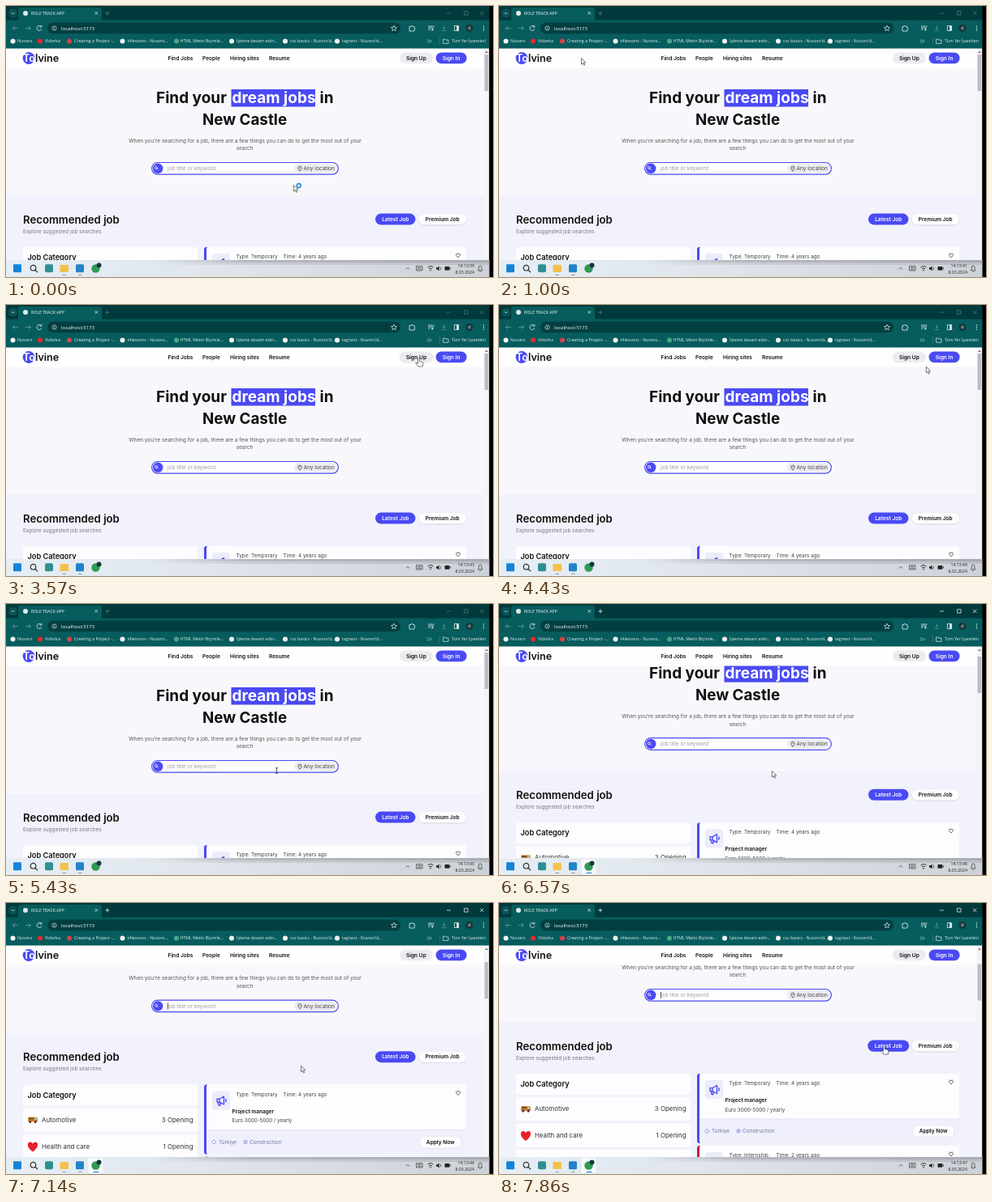
These frames come from a looping animation (600 px wide and 335 px high, 8000 ms). An HTML page:

```html
<!DOCTYPE html>
<html lang="en">
<head>
<meta charset="utf-8">
<title>Job search page</title>
<style>
  html, body { margin: 0; width: 100%; height: 100%; overflow: hidden; background: #000; }
  svg { display: block; width: 100%; height: 100%; }
  text { font-family: Inter, sans-serif; white-space: pre; }
  .ui { font-family: "Open Sans", sans-serif; }
  .button { transform-box: fill-box; transform-origin: center; }
</style>
</head>
<body>
<svg id="stage" viewBox="0 0 600 335"></svg>
<script>
const BLUE = '#4a4af4', INK = '#111', GREY = '#666', LIGHT = '#e4f0f0';

// Markup helpers
const rect = (x, y, w, h, fill, r = 0, extra = '') =>
  `<rect x="${x}" y="${y}" width="${w}" height="${h}" rx="${r}" fill="${fill}" ${extra}/>`;
const dot = (x, y, r, fill, extra = '') => `<circle cx="${x}" cy="${y}" r="${r}" fill="${fill}" ${extra}/>`;
const line = (d, color, width = 0.8, extra = '') =>
  `<path d="${d}" fill="none" stroke="${color}" stroke-width="${width}" ${extra}/>`;
const shape = (d, fill, extra = '') => `<path d="${d}" fill="${fill}" ${extra}/>`;
const text = (x, y, str, size, fill = INK, weight = 400, extra = '') =>
  `<text x="${x}" y="${y}" font-size="${size}" fill="${fill}" font-weight="${weight}" ${extra}>${str}</text>`;
const ui = (x, y, str, size = 5.3, fill = LIGHT, extra = '') => text(x, y, str, size, fill, 400, 'class="ui" ' + extra);
const group = (id, body, extra = '') => `<g id="${id}" ${extra}>${body}</g>`;
const at = (x, y, body) => `<g transform="translate(${x} ${y})">${body}</g>`;
const gradient = (id, attrs, ...stops) => `<linearGradient id="${id}" ${attrs}>` + stops.map(([offset, color, alpha = 1]) =>
  `<stop offset="${offset}" stop-color="${color}" stop-opacity="${alpha}"/>`).join('') + '</linearGradient>';
const middle = 'text-anchor="middle"', end = 'text-anchor="end"';

const lens = (x, y, r, color, width) =>
  line(`M${x - r} ${y}a${r} ${r} 0 1 1 ${2 * r} 0a${r} ${r} 0 1 1 ${-2 * r} 0M${x + r * .7} ${y + r * .7}l${r} ${r}`, color, width);
const HEART = 'M0 3C-4 0-3-2.6-1.5-2.6Q-.4-2.6 0-1.5Q.4-2.6 1.5-2.6C3-2.6 4 0 0 3Z';

function pill(id, x, y, w, h, label, fill, color, extra = '') {
  return group(id, rect(x, y, w, h, fill, h / 2, extra) +
    text(x + w / 2, y + h / 2 + 2.3, label, 6.6, color, 600, middle), 'class="button"');
}

const megaphone = line('M-5-1.8H-2L3.5-5V5L-2 2H-5ZM-2-1.8V2M-4 2L-3 6H-.8L-1.6 2M5.4-2Q7 0 5.4 2M3.5-1.2V1.2',
  BLUE, 1.3, 'stroke-linejoin="round"');

function jobCard(y, color, kind, age) {
  return rect(246, y, 321, 86, '#fdfdff', 3) +
    shape(`M246 ${y + 56}H567V${y + 83}q0 3-3 3H246Z`, '#f0f0fd') +
    line(`M246 ${y + 56}H567`, '#d9d9f4', .7) +
    shape(`M248 ${y}h-1q-3 0-3 3v80q0 3 3 3h1q-1-1-1-3v-80q0-2 1-3Z`, color) +
    rect(254, y + 8, 22, 23, '#ececfb', 3) +
    at(265, y + 19.5, megaphone) +
    text(283.5, y + 14, 'Type: ' + kind, 6.35, '#444') +
    text(341.5, y + 14, `Time: ${age} years ago`, 6.35, '#444') +
    at(557, y + 10.3, line(HEART, '#222', .8, 'transform="scale(.85)"'));
}

function categoryRow(y, label, count, icon) {
  return rect(21, y, 215, 29, '#fdfdff', 3) + at(33, y + 14.5, icon) +
    text(44, y + 17, label, 7.9, '#333') + text(230.5, y + 17, count, 7.9, '#333', 400, end);
}

const bus = rect(-6, -3.5, 12, 6, '#e9a23a', 1.2) + rect(-5, -2.6, 6.5, 2.2, '#6b4a35') +
  rect(2.5, -2.6, 2.7, 2.2, '#8fc3dc') + rect(-6, .6, 12, .9, '#c0392b') +
  dot(-3.2, 2.8, 1.4, '#333') + dot(3.2, 2.8, 1.4, '#333');
const heart = shape(HEART, '#e8202a', 'transform="scale(2.15)"');

const page =
  rect(0, 52, 589, 482, '#f8f8fc') + rect(0, 234, 589, 300, '#f2f2fc') +
  text(185, 120.3, 'Find your', 19, INK, 700) +
  rect(277.5, 103, 103.5, 21.5, BLUE) +
  text(278.5, 120.3, 'dream jobs', 19, '#fff', 700) +
  text(386.5, 120.3, 'in', 19, INK, 700) +
  text(294, 147, 'New Castle', 18.8, INK, 700, middle) +
  text(294.5, 168.6, "When you're searching for a job, there are a few things you can do to get the most out of your",
    6.47, '#555', 400, middle) +
  text(294, 178.4, 'search', 6.47, '#555', 400, middle) +
  rect(179.6, 193.5, 229.8, 14.6, '#fdfdff', 7.3, `stroke="${BLUE}" stroke-width="1.2"`) +
  dot(187.2, 200.8, 6.2, BLUE) + lens(185, 200, 1.5, '#fff', .8) +
  text(199, 203, 'job title or keyword', 6.55, '#a0a0a4') +
  group('caret', line('M199.5 197V204.6', '#222', .8)) +
  rect(355, 195, 52, 11.6, '#ececf1', 5.8) +
  line('M362 204.2Q358.4 200.5 360.2 198.7Q362 197.3 363.8 198.7Q365.6 200.5 362 204.2Z', '#333', .7) +
  dot(362, 200.2, .6, '#333') +
  text(366.5, 203, 'Any location', 6.55, '#444') +
  text(21, 268.5, 'Recommended job', 13.2, INK, 600) +
  text(21, 280.8, 'Explore suggested job searches', 6.4, '#777') +
  pill('latest', 455, 256.6, 49.5, 14, 'Latest Job', BLUE, '#fff') +
  rect(508.3, 257.4, 59, 14, '#d6d6e2', 7) +
  pill('premium', 508.3, 256.6, 59, 14, 'Premium Job', '#fdfdff', INK, 'stroke="#e4e4ee" stroke-width=".6"') +
  rect(21, 298, 215, 26, '#fdfdff', 3) + text(26.5, 314, 'Job Category', 9.2, INK, 600) +
  categoryRow(327, 'Automotive', '3 Opening', bus) +
  categoryRow(360, 'Health and care', '1 Opening', heart) +
  rect(21, 392, 215, 29, '#fdfdff', 3) +
  jobCard(298, BLUE, 'Temporary', 4) +
  text(278.5, 333, 'Project manager', 6.5, INK, 600) +
  text(278.5, 344.5, 'Euro 3000-5000 / yearly', 6.3, '#444') +
  line('M256.3 366.2L259 368.9L256.3 371.6L253.6 368.9Z', '#7b7bd8', .8) +
  text(262, 371.2, 'Türkiye', 6.3, '#7272a0') +
  dot(295, 368.9, 2.2, 'none', 'stroke="#7b7bd8" stroke-width=".8"') + dot(295, 368.9, .8, '#7b7bd8') +
  text(300, 371.2, 'Construction', 6.5, '#7272a0') +
  pill('apply', 509.5, 361.8, 51.5, 14.4, 'Apply Now', '#fdfdff', INK, 'stroke="#dedeea" stroke-width=".6"') +
  jobCard(387, '#c8203c', 'Internship', 2);

const navLinks = [[199.5, 'Find Jobs', 31], [242, 'People', 23], [276, 'Hiring sites', 38], [324, 'Resume', 27]];
const header =
  rect(0, 51, 589, 25.5, '#fefefe') +
  dot(28, 64.5, 7.4, BLUE) +
  text(21, 68.8, '<tspan fill="#fff">To</tspan>lvine', 12.6, INK, 600) +
  navLinks.map(([x, label], i) => text(x, 67, label, 6.6, INK, 600, `id="nav${i}"`)).join('') +
  pill('signUp', 485, 57.6, 40.8, 13.6, 'Sign Up', '#ececf0', INK) +
  pill('signIn', 529.6, 57.6, 38, 13.6, 'Sign In', BLUE, '#fff');

const scrollbar =
  rect(588.6, 51, 6.6, 264, '#f4f4f5') + shape('M590 58L592 55.4L594 58Z', '#777') +
  rect(589.6, 60, 4.6, 45, '#bdbdc0', 0, 'id="thumb"');

const bookmarks = [
  [8.5, 14, 'Nuvoro', '#f1f3f4'], [42, 48, 'Vidorka', '#e8262d'], [78, 84, 'Creating a Project -...', '#d8414a'],
  [143.5, 149.5, 't4lessons - Nuvoro...', '#f1f3f4'], [210, 214.5, 'HTML Metin Biçimle...', '#4aa58a'],
  [278, 284, 'İşleme devam edin...', '#f1f3f4'], [344, 350, "css basics - Nuvoro'd...", '#f1f3f4'],
  [408, 414, "tagnest - Nuvoro'd...", '#f1f3f4']
];
const browser =
  rect(0, 0, 595.5, 18, '#003a3c') + rect(0, 17.5, 595.5, 35, '#075c5d') +
  shape('M13 18Q15 18 15 15V5Q15 2 18 2H115Q118 2 118 5V15Q118 18 120 18Z', '#075c5d') +
  rect(3.5, 4, 10, 10, '#0b5355', 3) + line('M6.8 8.2L8.6 10L10.4 8.2', LIGHT) +
  dot(24, 9, 3, '#dfe9e9') + ui(31, 11, 'ROLE TRACK APP', 5.2, '#fff') +
  line('M109.6 7.2L113 10.6M113 7.2L109.6 10.6', LIGHT) +
  group('controls', line('M122.4 9H127.4M124.9 6.5V11.5', LIGHT) +
    line('M543 9H548M564.6 6.7H569V11.1H564.6ZM584 6.7L588.4 11.1M588.4 6.7L584 11.1', '#fff', .7)) +
  line('M14.6 27.5H8.2M11 24.7L8.2 27.5L11 30.3M24 27.5H30.4M27.6 24.7L30.4 27.5L27.6 30.3', '#6f9c9c') +
  line('M43.4 25.6A3 3 0 1 0 43.9 28.4M43.8 23.8V26H41.5', LIGHT) +
  rect(51, 20.6, 435, 13.6, '#033f41', 6.8) +
  dot(59.5, 27.5, 2.6, 'none', `stroke="${LIGHT}" stroke-width=".7"`) + line('M59.5 27V29M59.5 25.8V26.4', LIGHT, .7) +
  ui(68, 29.6, 'localhost:5173', 6.1, '#fff') +
  line('M478 24L479 26.4L481.5 26.6L479.6 28.2L480.2 30.7L478 29.3L475.8 30.7L476.4 28.2L474.5 26.6L477 26.4Z', LIGHT, .7) +
  line('M497 25.4H499A1 1 0 0 1 501 25.4H503V27A1 1 0 0 1 503 29V31H497Z', LIGHT) +
  line('M520 25H525M520 27H525M520 29H522.5M527.5 25H526V29.5', LIGHT, .8) + dot(525.2, 29.6, 1, LIGHT) +
  line('M539.5 24V28.5M537.5 26.7L539.5 28.7L541.5 26.7M536.8 30.6H542.2', '#4f9a9c') +
  line('M552.4 24.5H557.6V30.5H552.4Z', LIGHT) + rect(555.2, 24.5, 2.4, 6, LIGHT) +
  dot(571, 27.5, 4.6, '#17383b') + ui(571, 29.4, 'd', 5.4, '#fff', middle) +
  dot(588.5, 25, .7, LIGHT) + dot(588.5, 27.5, .7, LIGHT) + dot(588.5, 30, .7, LIGHT) +
  bookmarks.map(([ix, tx, label, color]) => dot(ix, 43.5, 3, color) + ui(tx, 45.4, label)).join('') +
  line('M519 41.5L521 43.5L519 45.5M522 41.5L524 43.5L522 45.5', LIGHT, .7) + line('M534.5 39V48', '#3c8586', .7) +
  line('M538.6 41H541L541.8 42H545V46.3H538.6Z', LIGHT, .7) + ui(549, 45.4, 'Tüm Yer İşaretleri', 5.2);

const status = rect(0, 305, 43.5, 9.5, '#07494b', 1) + ui(2, 311.6, 'localhost:5173/#', 5.4, '#fff');

const taskbar =
  gradient('bar', '', [0, '#e6eef5'], [.4, '#e0e6ec'], [1, '#cdd2d8']) +
  gradient('shade', '', [.3, '#85858d', 0], [.5, '#85858d', .45], [1, '#85858d', .5]) +
  rect(0, 314, 595.5, 21, 'url(#bar)') +
  rect(0, 314, 595.5, 3, 'url(#shade)') + rect(0, 317, 595.5, 3, 'url(#shade)', 0, 'opacity=".5"') +
  rect(9, 319.3, 10, 10, '#1583d8', 1) + lens(33.5, 323.7, 3.3, '#333', 1.2) +
  rect(48, 319.3, 10, 10, '#2f8f93', 2) + rect(66.5, 320, 10.5, 9, '#f3c14b', 1) +
  rect(86, 319.3, 10, 10, '#2383c9', 1.5) +
  group('activeTile', rect(101.5, 315.5, 18, 18, '#f7fafc', 2.5) + rect(107.5, 332, 7, 1.1, '#1677c8', .5)) +
  dot(110.5, 324.5, 5.2, '#2f9a55') + dot(114.5, 320.5, 3, '#17383b') +
  rect(69.5, 332, 4.5, 1, '#8b949b', .5) + rect(89, 332, 4.5, 1, '#8b949b', .5) +
  line('M492.8 325.5L495 323.3L497.2 325.5M505.5 321.7H513V327H505.5ZM507 323.4H511.5M507 325.3H511.5', '#333', .7) +
  line('M519.5 323.2Q523 319.8 526.5 323.2M521 325Q523 323 525 325', '#222', .9) + dot(523, 326.8, .8, '#222') +
  shape('M530 323.2H531.6L533.6 321.4V327.6L531.6 325.8H530Z', '#222') + line('M535 322.6Q536.4 324.5 535 326.4', '#222', .7) +
  rect(540.5, 322, 6, 4.8, '#222', 1) + rect(547, 323.4, .8, 2, '#222') +
  ui(577, 323.3, '', 5.2, '#222', 'id="clock" ' + end) +
  ui(577, 330.6, '8.03.2024', 5.2, '#222', end) +
  line('M581.5 327H587L586 325.5V323Q586 321 584.2 321Q582.4 321 582.4 323V325.5ZM583.5 328.4H585', '#333', .7);

const outlined = 'stroke="#222" stroke-width=".6" stroke-linejoin="round"';
const pointers =
  group('arrow', shape('M0 0V7.6L1.8 6L3 8.8L4.2 8.3L3 5.6H5.4Z', '#fff', outlined)) +
  group('hand', shape('M-1 1Q0-.6 1 1V4.2L4.6 5Q5.6 5.4 5.4 6.6L4.8 10.5H-.6L-3.6 6.6Q-3.4 5.4-2.4 5.9L-1 7Z', '#fff', outlined)) +
  group('beam', line('M-1.5-3.3H1.5M0-3.3V3.3M-1.5 3.3H1.5', '#222', .7)) +
  group('busy', dot(6.2, .6, 2.6, '#cfe6fb', 'stroke="#1d7fd6" stroke-width="1.3"'));

document.getElementById('stage').innerHTML =
  group('page', page) + header + scrollbar + group('status', status) + browser + taskbar + group('pointer', pointers);

// Motion
const LOOP = 8000;
const FOCUS_TIME = 5650;
const path = [[0, 354.5, 221.5], [140, 354.5, 221.5], [1000, 101.5, 64.5], [1300, 103, 64.8], [2570, 312, 65.5],
  [3570, 508.5, 65.5], [4200, 546, 63], [5430, 333.5, 206], [5800, 333.5, 204], [6860, 337, 207], [7860, 474.5, 176.5]];
const scrollKeys = [[0, 0], [6200, 0], [6860, 49.5], [7300, 87]];
const clockTicks = [140, 900, 2140, 3150, 4200, 5200, 6200, 7300];

// id, x, y, width, height, moves with the page
const targets = [
  ...navLinks.map(([x, , w], i) => ['nav' + i, x, 58, w, 13]),
  ['signUp', 485, 57.6, 41, 13.6], ['signIn', 529.6, 57.6, 38, 13.6],
  ['latest', 455, 256.6, 49.5, 14, true], ['premium', 508, 256.6, 59, 14, true]
];

const el = id => document.getElementById(id);
const show = (id, on) => el(id).setAttribute('visibility', on ? 'visible' : 'hidden');

function sample(keys, t, ease = u => u) {
  const i = keys.findIndex(k => k[0] > t);
  if (i < 0) return keys[keys.length - 1].slice(1);
  const [a, b] = [keys[i - 1], keys[i]];
  const u = ease((t - a[0]) / (b[0] - a[0]));
  return a.slice(1).map((v, n) => v + (b[n + 1] - v) * u);
}

function draw(t) {
  const [scroll] = sample(scrollKeys, t);
  const [x, y] = sample(path, t, u => u * u * (3 - 2 * u));
  const inside = (rx, ry, w, h) => x >= rx && x <= rx + w && y >= ry && y <= ry + h;

  el('page').setAttribute('transform', `translate(0 ${-scroll})`);
  el('thumb').setAttribute('y', 60 + scroll / 5.6);
  el('pointer').setAttribute('transform', `translate(${x} ${y})`);

  let overLink = false;
  for (const [id, rx, ry, w, h, moves] of targets) {
    const over = inside(rx, ry - (moves ? scroll : 0), w, h);
    overLink = overLink || over;
    if (id.startsWith('nav')) el(id).setAttribute('fill', over ? BLUE : INK);
    else el(id).style.transform = over ? 'scale(1.03)' : 'none';
  }
  const overField = inside(195, 194 - scroll, 160, 14);
  show('hand', overLink);
  show('beam', overField);
  show('arrow', !overLink && !overField);
  show('busy', t < 280);
  show('status', t > 1750 && t < 3500);

  // The click in the search field also activates the window
  const focused = t >= FOCUS_TIME;
  el('controls').setAttribute('opacity', focused ? 1 : .35);
  show('activeTile', focused);
  show('caret', focused && (t - FOCUS_TIME) % 1060 < 530);
  el('clock').textContent = '14:13:' + (39 + clockTicks.filter(tick => t >= tick).length);
}

const start = performance.now();
function frame() {
  draw((performance.now() - start) % LOOP);
  requestAnimationFrame(frame);
}
frame();
</script>
</body>
</html>
```
